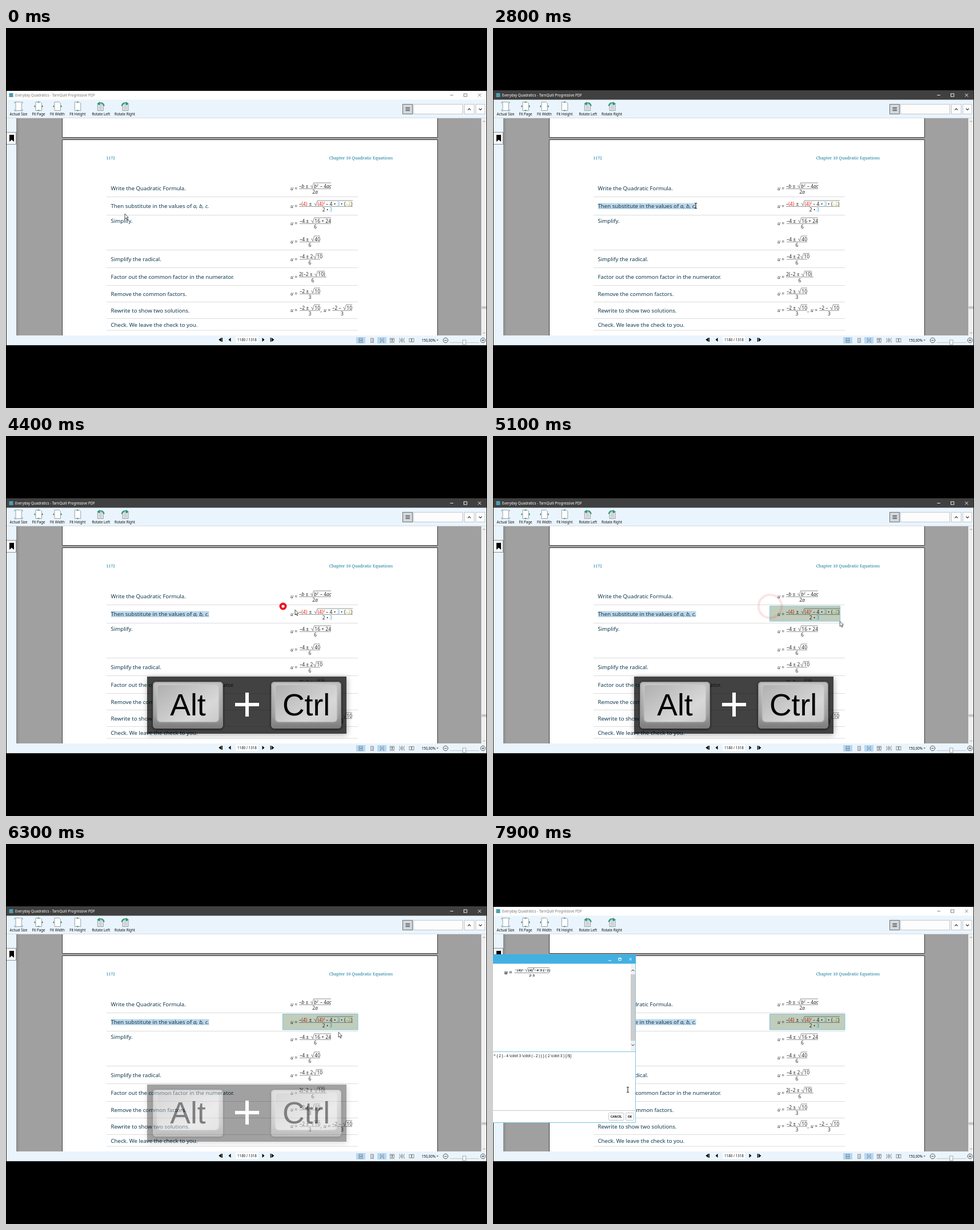
Animation, 842 px wide and 665 px high, one loop 8000 ms. Source, as an HTML page:

```html
<!DOCTYPE html>
<html lang="en">
<head>
<meta charset="utf-8">
<title>PDF reader</title>
<style>
html, body { margin: 0; width: 100%; height: 100%; overflow: hidden; background: #000; }
#stage { position: absolute; left: 0; top: 0; width: 842px; height: 665px; overflow: hidden; }
svg { position: absolute; left: 0; top: 0; }
text { font-family: "Noto Sans", "Open Sans", sans-serif; white-space: pre; }
.ui { font-size: 6.2px; fill: #111; }
.bold { font-size: 5.1px; font-weight: 700; }
.mid { text-anchor: middle; }
.doc { font-size: 9.65px; fill: #0f394f; }
.head { font-family: "Noto Serif", serif; font-size: 7.35px; fill: #0f7a9a; }
.math { font-size: 8.5px; fill: #2c2c2c; }
.sup { font-size: 5px; }
.i { font-style: italic; }
.red { fill: #df2b1c; }
.blue { fill: #3fb4e6; }
.gold { fill: #c5bd3a; }
.tex { font: bold 7px "Liberation Serif", serif; fill: #111; }
.rule { stroke: #dcdcdc; fill: none; }
.line { stroke: #555; stroke-width: .65; fill: none; }
.btn { fill: #fdfdfd; stroke: #c4c8cc; }

#cursor, #arrow, #beam, #active, #sel, #area, #pulse, #keys, #dialog, #late, #code, #buttons {
  animation: 8s linear infinite;
}
#cursor { animation-name: move; }
@keyframes move {
  0% { transform: translate(208px, 325px); }
  3.75% { transform: translate(208px, 325px); animation-timing-function: steps(8); }
  13.75% { transform: translate(187px, 311px); }
  17.5% { transform: translate(187px, 311px); animation-timing-function: steps(14); }
  34.95% { transform: translate(355px, 311px); }
  38.75% { transform: translate(355px, 311px); animation-timing-function: steps(3); }
  42.5% { transform: translate(476px, 299px); }
  43.75% { transform: translate(476px, 299px); animation-timing-function: steps(5); }
  50% { transform: translate(485px, 298px); }
  51.25% { transform: translate(485px, 298px); animation-timing-function: steps(3); }
  54.95% { transform: translate(506px, 304px); animation-timing-function: steps(6); }
  62.5% { transform: translate(605px, 324px); animation-timing-function: steps(5); }
  68.75% { transform: translate(616px, 325px); }
  71.25% { transform: translate(616px, 325px); animation-timing-function: steps(4); }
  76.2% { transform: translate(588px, 328px); animation-timing-function: steps(5); }
  82.5% { transform: translate(573px, 331px); animation-timing-function: steps(2); }
  84.95% { transform: translate(442px, 358px); animation-timing-function: steps(7); }
  93.75% { transform: translate(246px, 416px); animation-timing-function: steps(4); }
  98.7%, 100% { transform: translate(236px, 430px); }
}
#arrow { animation-name: arrow; animation-timing-function: step-end; }
@keyframes arrow { 0% { opacity: 1; } 11.2% { opacity: 0; } 39.95% { opacity: 1; } 94.95%, 100% { opacity: 0; } }
#beam { animation-name: beam; animation-timing-function: step-end; }
@keyframes beam { 0% { opacity: 0; } 11.2% { opacity: 1; } 39.95% { opacity: 0; } 94.95%, 100% { opacity: 1; } }
#active { animation-name: active; animation-timing-function: step-end; }
@keyframes active { 0% { opacity: 0; } 16.2% { opacity: 1; } 81.2%, 100% { opacity: 0; } }
#sel { animation-name: sel; transform-origin: 184px 311px; }
@keyframes sel {
  0% { transform: scaleX(0); }
  17.5% { transform: scaleX(0); animation-timing-function: steps(14); }
  34.95%, 100% { transform: scaleX(1); }
}
#area { animation-name: area; transform-origin: 484.5px 297.5px; mix-blend-mode: multiply; }
@keyframes area {
  0% { opacity: 0; transform: scale(.28, .35); }
  56.2% { opacity: 0; transform: scale(.28, .35); animation-timing-function: step-start; }
  56.25% { opacity: 1; transform: scale(.28, .35); animation-timing-function: steps(5); }
  62.5% { opacity: 1; transform: scale(.92, .96); animation-timing-function: steps(5); }
  68.75%, 100% { opacity: 1; transform: none; }
}
#pulse { animation-name: pulse; transform-origin: 485px 298px; }
@keyframes pulse {
  0% { opacity: 0; transform: scale(.6); animation-timing-function: step-end; }
  53.7% { opacity: 1; transform: scale(.6); animation-timing-function: step-end; }
  54.95% { opacity: 1; transform: scale(1); animation-timing-function: steps(8); }
  65%, 100% { opacity: 0; transform: scale(5); }
}
#keys { animation-name: keys; }
@keyframes keys {
  0% { opacity: 0; }
  43.75% { opacity: 0; animation-timing-function: steps(5); }
  50% { opacity: 1; }
  76.25% { opacity: 1; animation-timing-function: steps(4); }
  81.2%, 100% { opacity: 0; }
}
#dialog { animation-name: dialog; animation-timing-function: step-end; }
@keyframes dialog { 0% { opacity: 0; } 81.2%, 100% { opacity: 1; } }
#late { animation-name: late; animation-timing-function: step-end; }
@keyframes late { 0% { opacity: 0; } 90%, 100% { opacity: 1; } }
#buttons { animation-name: nudge; animation-timing-function: step-end; }
@keyframes nudge { 0% { transform: none; } 90%, 100% { transform: translateX(-1px); } }
#code { animation-name: shift; animation-timing-function: step-end; }
@keyframes shift { 0% { transform: none; } 94.95%, 100% { transform: translateX(-1px); } }

#keys {
  position: absolute; left: 247px; top: 421px; width: 349px; height: 100px;
  background: rgba(0, 0, 0, .74); box-shadow: 1px 2px 10px rgba(0, 0, 0, .3);
}
.key {
  position: absolute; top: 9px; width: 123px; height: 82px; border-radius: 6px; box-sizing: border-box;
  background: linear-gradient(#c2c2c2, #a0a0a0 70%, #7a7a7a);
  box-shadow: inset 0 0 2px 1px #858585, 0 1px 4px #111;
}
.key::before {
  content: ""; position: absolute; left: 8px; right: 8px; top: 6px; bottom: 12px; border-radius: 5px;
  background: linear-gradient(145deg, #b0b0b0, #d8d8d8 70%, #cacaca);
  box-shadow: 0 0 3px #ddd;
}
.key span {
  position: absolute; left: 0; right: 0; top: 11px; text-align: center; color: #000;
  font: 53.5px/60px "Liberation Sans", Arial, sans-serif;
}
.plus { position: absolute; left: 154px; top: 28px; width: 42px; height: 42px;
  background: linear-gradient(#fff, #fff) 50% 50% / 100% 6px no-repeat, linear-gradient(#fff, #fff) 50% 50% / 6px 100% no-repeat; }
</style>
</head>
<body>
<div id="stage">
<svg width="842" height="665" viewBox="0 0 842 665">
  <defs>
    <linearGradient id="edge"><stop offset="0" stop-color="#8b8b8b"/><stop offset="1" stop-color="#a0a0a0"/></linearGradient>
    <path id="sheet" d="M-5 -7.5H3L5.5 -5V7.5H-5Z" fill="#fff" stroke="#8d979c" stroke-width=".9"/>
    <path id="tip" d="M-2 0L0 -2.2L2 0Z" fill="#2f8f74"/>
    <g id="winBtns" fill="none" stroke="currentColor" stroke-width=".9">
      <path d="M777.5 117.5H783M826.3 114.8L831.7 120.2M831.7 114.8L826.3 120.2"/>
      <rect x="801.5" y="115" width="5.4" height="5"/>
    </g>
  </defs>

  <rect y="110" width="842" height="445" fill="#eaf4fc"/>
  <g color="#777">
    <rect y="110" width="842" height="15.5" fill="#fff"/>
    <text class="ui" x="16" y="120" style="fill:#777">Everyday Quadratics - TarnQuill Progressive PDF</text>
    <use href="#winBtns"/>
  </g>
  <g id="active" color="#fff">
    <rect y="109" width="842" height="16.5" fill="#404040"/>
    <text class="ui" x="16" y="120" style="fill:#fff">Everyday Quadratics - TarnQuill Progressive PDF</text>
    <use href="#winBtns"/>
  </g>
  <rect x="5.5" y="114" width="7" height="7" fill="#4a9fb2"/>

  <g id="tools"></g>
  <g fill="none" stroke="#333">
    <rect x="694.5" y="133.5" width="17" height="17" fill="#d3d8dd" stroke="#6b7176"/>
    <path d="M699.5 139.5H707M699.5 142H707M699.5 144.5H707"/>
    <rect class="btn" x="713.5" y="133.5" width="86" height="17"/>
    <rect class="btn" x="802.5" y="133.5" width="17" height="17"/>
    <rect class="btn" x="822.5" y="133.5" width="16" height="17"/>
    <path d="M808.5 143.5L811 141L813.5 143.5M828 141L830.5 143.5L833 141" stroke-width="1.1"/>
  </g>

  <rect x="18" y="158" width="814" height="380" fill="#a0a0a0"/>
  <rect x="18" y="158" width="6" height="380" fill="url(#edge)"/>
  <path d="M0 157.5H842" stroke="#d5dce2"/>
  <g fill="#fff" stroke="#3c3c3c">
    <path d="M98.5 158V191.5H755.5V158"/>
    <path d="M98.5 538V195.5H755.5V538"/>
  </g>
  <rect x="-.5" y="182.5" width="18" height="21" fill="#f4f8fb" stroke="#8b9196"/>
  <path d="M6 187H14V199L10 195.5L6 199Z" fill="#000"/>
  <rect x="832" y="158" width="10" height="380" fill="#f0f0f0"/>
  <rect x="832.5" y="487" width="9" height="4.5" fill="#c6c6c6"/>
  <path d="M835 164.5L837 162.5L839 164.5M835 532.5L837 534.5L839 532.5" fill="none" stroke="#777" stroke-width=".8"/>

  <text class="head" x="175.5" y="229.5" style="font-size:6.9px">1172</text>
  <text class="head" x="565.5" y="229.5">Chapter 10 Quadratic Equations</text>
  <rect id="sel" x="184" y="306.5" width="171.5" height="10.5" fill="#bfd7ea"/>
  <g id="page"></g>
  <rect id="area" x="484.5" y="297.5" width="131.5" height="27.5" fill="#c0cdbb" stroke="#7fc3dc" vector-effect="non-scaling-stroke"/>
  <circle id="pulse" cx="485" cy="298" r="4.5" fill="none" stroke="#ee1420" stroke-width="4" vector-effect="non-scaling-stroke"/>

  <rect y="538" width="842" height="17" fill="#eaf4fc"/>
  <rect x="402" y="540" width="39" height="11" fill="#fff"/>
  <text class="ui mid" x="422" y="548">1180 / 1318</text>
  <path d="M376.8 542V549L372.3 545.5ZM393.5 542V549L389.5 545.5ZM448.5 542V549L452.5 545.5ZM465 542V549L469.5 545.5ZM377.5 542H379V549H377.5ZM462.7 542H464.2V549H462.7Z" fill="#000"/>
  <g id="views"></g>
  <text class="ui" x="727.5" y="549">150,00%</text>
  <path d="M753.5 545.5H757L755.2 547.5Z" fill="#555"/>
  <path d="M777 550.5H828" stroke="#c4c9cd"/>
  <rect x="799.5" y="546" width="5.5" height="8" fill="#f6f6f6" stroke="#999" stroke-width=".8"/>
  <g fill="none" stroke="#444" stroke-width=".9">
    <circle cx="769.5" cy="546.5" r="4.2"/><circle cx="835" cy="546.5" r="4.2"/>
    <path d="M767.3 546.5H771.7M832.8 546.5H837.2M835 544.3V548.7"/>
  </g>
  <path d="M.5 109V556M841.5 109V556M0 555.5H842" stroke="#222"/>

  <g id="dialog">
    <rect x="-1" y="193" width="251" height="295" fill="#fff"/>
    <rect y="193" width="250" height="16.5" fill="#43b0e2"/>
    <path d="M249.5 209V487.5H0M0 363.5H249" fill="none" stroke="#6fbfe0" stroke-width=".9"/>
    <path d="M0 466.5H249" stroke="#c9c9c9"/>
    <path d="M202 204H207M238.5 199.5L242.7 203.7M242.7 199.5L238.5 203.7M219.8 199.5H224.2V203.7H219.8ZM219.8 200.2H224.2" fill="none" stroke="#fff"/>
    <text id="code" class="ui" x="2" y="373" style="font-size:6.3px">^ { 2 } - 4 \cdot 3 \cdot ( - 2 ) } } { 2 \cdot 3 } [/$]</text>
    <g id="buttons">
      <rect class="btn" x="203.5" y="470.5" width="26.5" height="13" rx="1"/>
      <rect class="btn" x="233.5" y="470.5" width="14" height="13" rx="1"/>
      <text class="ui mid bold" x="216.8" y="479">CANCEL</text>
      <text class="ui mid bold" x="240.5" y="479">OK</text>
    </g>
    <g id="late">
      <rect x="241" y="210" width="8" height="153" fill="#f1f1f1"/>
      <rect x="241" y="228" width="8" height="116.5" fill="#cdcdcd"/>
      <path d="M242.5 222.5L245 220L247.5 222.5M242.5 350.5L245 353L247.5 350.5" fill="none" stroke="#333"/>
      <text class="tex" x="20" y="228" style="font-size:10px"><tspan class="i">u</tspan> =</text>
      <text class="tex" x="38.5" y="222.5" style="font-size:6.7px">−(4)+</text>
      <text class="tex" x="61.5" y="222.5">(4)</text>
      <text class="tex" x="69.7" y="219.7" style="font-size:4.8px">2</text>
      <text class="tex" x="72.2" y="222.5">−4·3·(−2)</text>
      <path class="line" d="M55.5 220L57 219.5L58.8 223.5L61 216.5H99M37.5 225.5H99"/>
      <text class="tex mid" x="68" y="231.5">2·3</text>
    </g>
  </g>

  <g id="cursor">
    <path id="arrow" d="M0 0V9L2 7.2L3.5 10.5L4.9 9.9L3.5 6.7H6.3Z" fill="#fff" stroke="#222" stroke-width=".8"/>
    <path id="beam" d="M-2 -4.5H-.6L0 -4L.6 -4.5H2M0 -4V4M-2 4.5H-.6L0 4L.6 4.5H2" fill="none" stroke="#111"/>
  </g>
</svg>
<div id="keys">
  <div class="key" style="left:10px"><span>Alt</span></div>
  <div class="plus"></div>
  <div class="key" style="left:217px"><span>Ctrl</span></div>
</div>
</div>
<script>
const put = (id, parts) => { document.getElementById(id).innerHTML = parts.join(""); };
const text = (cls, x, y, s) => `<text class="${cls}" x="${x}" y="${y}">${s}</text>`;
const span = (cls, s) => `<tspan class="${cls}">${s}</tspan>`;
const math = (x, y, s) => text("math", x, y, s);
const line = d => `<path class="line" d="${d}"/>`;

// Radical whose bar runs from x + 6 to end, over text on baseline y
const root = (x, end, y) => line(`M${x} ${y - 3}L${x + 1.3} ${y - 3.6}L${x + 3} ${y + .6}L${x + 5.6} ${y - 8.5}H${end}`);

// "u =" followed by a fraction whose bar lies at y
const frac = (ux, x, end, y, num, den, denX = (x + end) / 2) =>
  math(ux, y + 3, span("i", "u") + " =") + num(y - 1.5) + line(`M${x} ${y + .3}H${end}`) +
  `<text class="math mid" x="${denX}" y="${y + 9}">${den}</text>`;

const surd = (x, lead, rx, body, end) => y => math(x, y, lead) + root(rx, end, y) + math(rx + 6.3, y, body);

const general = y => math(513, y, "–" + span("i", "b") + " ±") + root(533, 569, y) +
  math(539, y, span("i", "b")) + text("math sup", 544, y - 3, "2") + math(547.5, y, " – 4" + span("i", "ac"));

const filled = y => math(513, y, "–" + span("red", "(4)")) + math(530.5, y, "±") + root(539.5, 607, y) +
  math(545.5, y, span("red", "(4)")) + text("math sup red", 555.5, y - 3, "2") + math(560, y, "– 4") +
  math(574, y, "•") + math(579.5, y, span("blue", "3")) + math(586, y, "•") +
  math(592, y, "(" + span("gold", "–2") + ")");

const rows = [
  [284.3, "Write the Quadratic Formula."],
  [314.8, `Then substitute in the values of ${span("i", "a, b, c.")}`],
  [341.3, "Simplify."],
  [407.8, "Simplify the radical."],
  [438.8, "Factor out the common factor in the numerator."],
  [468.8, "Remove the common factors."],
  [497.8, "Rewrite to show two solutions."],
  [522.5, "Check. We leave the check to you."]
];
const rules = [295.5, 327.5, 388.5, 419.5, 450.5, 479.5, 508.5, 529];

put("page", [
  ...rules.map(y => `<path class="rule" d="M176 ${y}H616"/>`),
  ...rows.map(([y, s]) => text("doc", 183.5, y, s)),
  frac(498, 513, 569, 281, general, "2" + span("i", "a")),
  frac(498, 513, 607, 312, filled, "2 • " + span("blue", "3"), 562.5),
  frac(498, 514, 569, 342, surd(514, "–4 ±", 534, "16 + 24", 569), "6"),
  frac(498, 514, 550, 374, surd(514, "–4 ±", 534, "40", 550), "6"),
  frac(498, 514, 550, 404.5, surd(514, "–4 ± 2", 538, "10", 554), "6"),
  frac(498, 513, 561, 435.5, surd(513, "2(–2 ±", 540, "10)", 558), "6"),
  frac(498, 514, 550, 465, surd(514, "–2 ±", 534, "10", 550), "3"),
  frac(498, 514, 550, 494, surd(514, "–2 ±", 534, "10", 550), "3"),
  math(550.5, 497, ","),
  frac(556, 571, 606, 494, surd(571, "–2 –", 590, "10", 606), "3")
]);

// Toolbar
const sheet = x => `<use href="#sheet" x="${x}" y="137"/>`;
const tip = (x, dx, dy, turn) => `<use href="#tip" transform="translate(${x + dx} ${137 + dy}) rotate(${turn})"/>`;
const across = x => tip(x, 6, 0, 90) + tip(x, -6, 0, -90);
const upDown = x => tip(x, 0, -6.5, 0) + tip(x, 0, 6.5, 180);
const corners = x => `<path d="M${x - 7} 132V129.5H${x - 4.5}M${x + 4.5} 129.5H${x + 7}V132M${x - 7} 142.5V145H${x - 4.5}M${x + 4.5} 145H${x + 7}V142.5" fill="none" stroke="#5fa7b8" stroke-width=".9"/>`;
const turn = (x, dir) => `<g transform="translate(${x} 137) scale(${dir} 1)">
  <rect x="-6" y="-3" width="10" height="10.5" fill="#e8ecee" stroke="#8d979c" stroke-width=".9"/>
  <path d="M-4 0H2M-4 2.5H2M-4 5H2" stroke="#9aa3a8" stroke-width=".8"/>
  <path d="M-4 -4.5Q3 -8.5 5.5 -.5" fill="none" stroke="#2f9674" stroke-width="2"/>
  <path d="M-7 -4.5L-2 -8V-1.5Z" fill="#2f9674"/></g>`;
const tools = [
  [22, "Actual Size", x => sheet(x) + corners(x)],
  [57, "Fit Page", x => sheet(x) + across(x) + upDown(x)],
  [90, "Fit Width", x => sheet(x) + across(x)],
  [125.3, "Fit Height", x => sheet(x) + upDown(x)],
  [166.3, "Rotate Left", x => turn(x, 1)],
  [208, "Rotate Right", x => turn(x, -1)]
];
put("tools", tools.map(([x, s, icon]) => icon(x) + text("ui mid", x, 152.5, s)));

// Page layout switches
const box = (x, y, w, h) => `<rect x="${x}" y="${y}" width="${w}" height="${h}"/>`;
const lit = x => `<rect x="${x - 8}" y="541" width="16" height="11" fill="#b4d8f5" stroke="none"/>`;
const icons = [
  lit(621), box(618, 543, 6, 3), box(618, 547.5, 6, 3),
  box(638.5, 543, 5, 7.5), "<path d='M640 545H642.5M640 547H642.5M640 549H642.5'/>",
  lit(658), "<path d='M655.5 542.5V545H661V542.5M655.5 551V547.5H661V551'/>",
  box(672.5, 544.5, 3, 4), box(676.5, 544.5, 3, 4), "<path d='M671.5 543H680M671.5 550.5H680'/>",
  "<path d='M689 542.5V545H697V542.5M689 551V547.5H697V551M693 542V551'/>",
  box(706, 543.5, 3.5, 6), box(710.5, 543.5, 3.5, 6)
];
put("views", [`<g fill="none" stroke="#777" stroke-width=".8">`, ...icons, "</g>"]);
</script>
</body>
</html>
```
